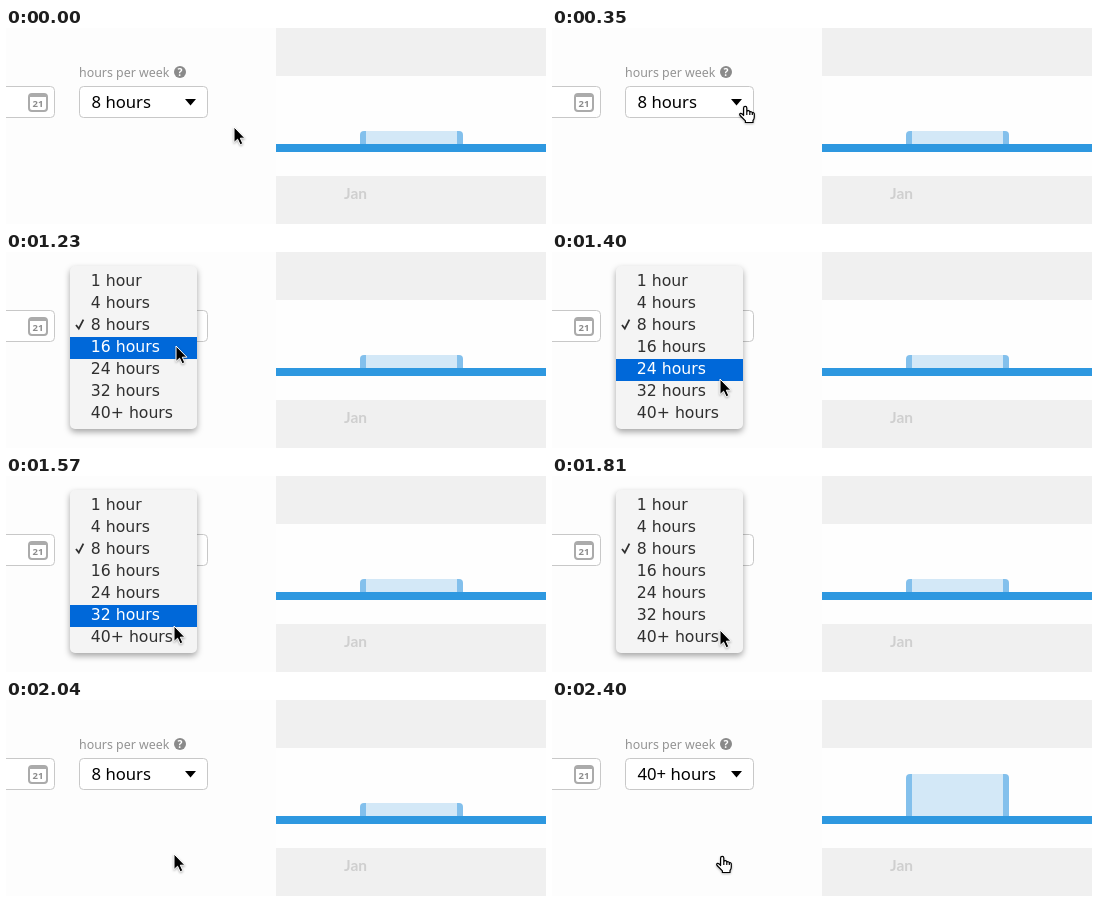
Animation, 540 px wide and 196 px high, one loop 3.74 s. Source, as an HTML page:

```html
<!DOCTYPE html>
<html lang="en">
<head>
<meta charset="utf-8">
<title>Hours per week</title>
<style>
  html, body { margin: 0; width: 100%; height: 100%; overflow: hidden; background: #fdfdfd; }
  svg { display: block; width: 540px; height: 196px; }
  text { font-family: "Noto Sans", "Open Sans", sans-serif; }
  .field { fill: #fff; stroke: #c8c8c8; }
  #menu text { font: 15.7px "DejaVu Sans", sans-serif; fill: #303030; }
  #menu .on text { fill: #fff; }
  #menu rect.row { fill: none; }
  #menu .on rect.row { fill: #0068d9; }
  .check { fill: none; stroke: #303030; stroke-width: 1.8; }
  .on .check { stroke: #fff; }
  #panel { fill: #f4f4f4; filter: drop-shadow(0 3px 3px rgba(0, 0, 0, .35)); }
  #cursor { filter: drop-shadow(0 1px 1px rgba(0, 0, 0, .3)); }
</style>
</head>
<body>
<svg viewBox="0 0 540 196">
  <!-- timeline -->
  <rect x="270" width="270" height="196" fill="#f0f0f0"/>
  <rect x="270" y="48" width="270" height="100" fill="#fefefe"/>
  <path id="bar" fill="#d3e8f7"/>
  <path id="leftEdge" fill="#83c0ec"/>
  <path id="rightEdge" fill="#83c0ec"/>
  <rect x="270" y="116" width="270" height="8" fill="#2e98e0"/>
  <text x="338" y="171" style="font:700 15.5px Lato,sans-serif" fill="#cfcfcf">Jan</text>

  <!-- form -->
  <rect class="field" x="-10" y="58.5" width="58.5" height="31" rx="4"/>
  <rect x="23" y="66" width="18" height="17" rx="3" fill="#fff" stroke="#ababab" stroke-width="2"/>
  <path d="M23 67.5h18" stroke="#ababab" stroke-width="3"/>
  <text x="32" y="79" font-size="9.5" font-weight="700" fill="#8c8c8c" text-anchor="middle">21</text>
  <text x="73" y="49" font-size="12.4" font-weight="500" fill="#939393">hours per week</text>
  <circle cx="174" cy="44" r="6" fill="#8a8a8a"/>
  <text x="174" y="48" font-size="10.5" font-weight="700" fill="#fff" text-anchor="middle">?</text>
  <rect class="field" x="73.5" y="58.5" width="128" height="31" rx="4"/>
  <text id="value" x="85.5" y="80" font-size="16.7" font-weight="500"></text>
  <path d="M179 71h11l-5.5 6.5z"/>

  <g id="menu"><rect id="panel" x="64" y="14" width="127" height="163" rx="5"/></g>
  <g id="cursor" stroke-linejoin="round">
    <path id="arrow" d="M0 0V15.5l3.6-3.3 2.6 5.6 2.6-1.2-2.5-5.4h4.6z" stroke="#fff"/>
    <path id="hand" fill="#fff" stroke="#000" stroke-width="1.2"
      d="M.6 11V4a1.6 1.6 0 0 1 3.2 0v4a1.5 1.5 0 0 1 3 .3a1.4 1.4 0 0 1 2.5.5a1.3 1.3 0 0 1 2 1v3.2q0 2-1.3 3.5v2H2.4v-1.7L-2.9 11.5q-1-1.8.4-2.2q1.4-.2 3.1 2.2zM3.8 8v3M6.8 8.3V11M9.3 8.8V11"/>
  </g>
</svg>
<script>
const LOOP = 3740, ROW = 22, FIRST = 19;
const el = id => document.getElementById(id);
const show = (node, visible) => { node.style.display = visible ? '' : 'none'; };
const mix = (a, b, p) => a + (b - a) * p;
const clamp = p => Math.min(1, Math.max(0, p));
const easeOut = (p, power) => 1 - (1 - p) ** power;

const rows = ['1 hour', '4 hours', '8 hours', '16 hours', '24 hours', '32 hours', '40+ hours'].map((label, i) => {
  const g = document.createElementNS('http://www.w3.org/2000/svg', 'g');
  const y = FIRST + ROW * i;
  g.innerHTML = `<rect class="row" x="64" y="${y}" width="127" height="${ROW}"/>` +
    `<text x="84.8" y="${y + 15}">${label}</text>` +
    (i === 2 ? `<path class="check" d="M70 ${y + 10}l2.8 3.6 4.6-9"/>` : '');
  el('menu').append(g);
  return g;
});

// Number of steps taken since the start of a stepped move, from 0 to count
const steps = (t, start, size, count) =>
  Math.min(count, Math.max(0, Math.floor((t - start) / size + 1.15)));

function drawBar(top) {
  const y = top + 4;
  el('bar').setAttribute('d', `M360 ${top}H451V116H360z`);
  el('leftEdge').setAttribute('d', `M360 ${top}V116H354V${y}q0-4 4-4z`);
  el('rightEdge').setAttribute('d', `M451 ${top}V116H457V${y}q0-4-4-4z`);
}

function draw(t) {
  const reach = steps(t, 60, 57.5, 9) / 9;
  const pick = steps(t, 1180, 56.25, 9) / 9;
  const close = steps(t, 1810, 59, 11);
  const chosen = close >= 6;

  // pointer
  let x = mix(228, 173, reach), y = mix(99, 69, easeOut(reach, 1.3));
  if (pick) {
    x = mix(173, 168, easeOut(pick, 3));
    y = mix(69, 154, easeOut(pick, 1.4));
  }
  const overField = t < 820 && x < 202 && y < 90;
  const hand = overField || chosen;
  el('cursor').setAttribute('transform', `translate(${Math.round(x)} ${Math.round(y)})`);
  show(el('hand'), hand);
  show(el('arrow'), !hand);

  // menu: the picked row blinks once, then everything fades
  show(el('menu'), t >= 820 && close < 5);
  el('menu').style.opacity = [1, 1, 1, .6, .25][close] ?? 0;
  const active = close === 1 ? -1 : Math.floor((Math.round(y) - FIRST) / ROW);
  rows.forEach((row, i) => row.classList.toggle('on', i === active));

  el('value').textContent = chosen ? '40+ hours' : '8 hours';
  const grow = clamp((close - 5) / 6);
  drawBar(mix(103, 74, easeOut(grow ** 1.5, 3)));
}

const begin = performance.now();
function tick() {
  draw((performance.now() - begin) % LOOP);
  requestAnimationFrame(tick);
}
tick();
</script>
</body>
</html>
```
